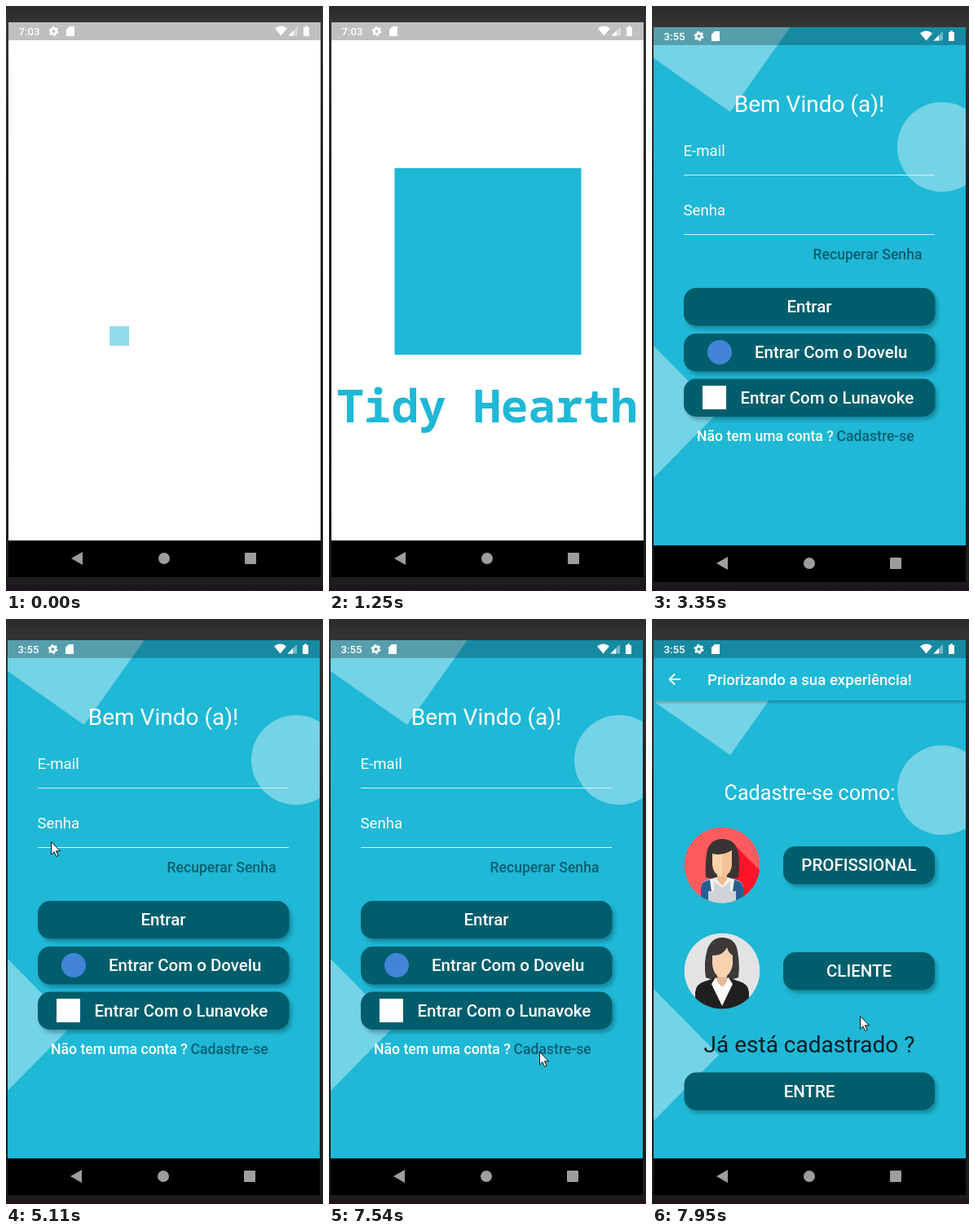
Animation, 389 px wide and 718 px high, one loop 8000 ms. Source, as an HTML page:

```html
<!DOCTYPE html>
<html lang="pt">
<head>
<meta charset="utf-8">
<style>
  html, body { margin: 0; width: 100%; height: 100%; overflow: hidden; background: #1e1e1e; }
  #stage { display: block; width: 389px; height: 718px; }
  text { font-family: Roboto, sans-serif; fill: #fff; white-space: pre; }
  .medium { font-weight: 500; }
  .button { fill: #005e6c; filter: drop-shadow(3px 4px 2px rgba(0, 40, 50, .3)); }
  .logo-name { font: 600 56px "Noto Sans Mono", monospace; fill: #1fb8d6; }
</style>
</head>
<body>
<svg id="stage" viewBox="0 0 389 718">
  <defs>
    <linearGradient id="desk" x2="0" y2="1">
      <stop offset="0" stop-color="#2b2b2c"/><stop offset=".03" stop-color="#343435"/>
      <stop offset=".3" stop-color="#222"/><stop offset=".985" stop-color="#1d1d1e"/>
      <stop offset="1" stop-color="#21131d"/>
    </linearGradient>
    <linearGradient id="barShadow" x2="0" y2="1">
      <stop stop-color="#000" stop-opacity=".25"/><stop offset="1" stop-color="#000" stop-opacity="0"/>
    </linearGradient>
    <clipPath id="disc"><circle r="46.5"/></clipPath>
  </defs>
  <rect width="389" height="718" fill="url(#desk)"/>
  <svg id="phone" width="383" height="681">
    <rect width="383" height="681" fill="#fff"/>
    <g id="splash">
      <rect id="mark" fill="#1fb8d6"/>
      <text id="logoName" class="logo-name" text-anchor="middle" y="20">Tidy Hearth</text>
    </g>
    <g id="login"></g>
    <g id="register"></g>
    <g id="system"></g>
  </svg>
  <circle id="click" cx="258" cy="531" r="12" fill="#fff" opacity=".4"/>
  <path id="cursor" d="M.5 .5V16L4 12.7L6.6 18.5L9 17.4L6.5 11.8H11.5Z" fill="#fff" stroke="#111"/>
</svg>
<script>
const $ = id => document.getElementById(id);
const DARK = '#075f70';

const label = (text, x, y, size, { fill = '#fff', medium = false, anchor = 'start' } = {}) =>
  `<text x="${x}" y="${y}" font-size="${size}" text-anchor="${anchor}" style="fill:${fill}"
    class="${medium ? 'medium' : ''}">${text}</text>`;
const centered = (text, x, y, size, options) => label(text, x, y, size, { anchor: 'middle', ...options });
const path = (d, fill) => `<path d="${d}" fill="${fill}"/>`;
const button = (x, y, width) => `<rect class="button" x="${x}" y="${y}" width="${width}" height="46.5" rx="15"/>`;
const underline = y => `<path d="M37 ${y}H345" stroke="#d5f3f9"/>`;

const backdrop = shift => `
  <rect width="383" height="640" fill="#1fb8d6"/>
  <g transform="translate(0 ${shift})" fill="#fff" fill-opacity=".38">
    <path d="M0 -40H196L94 104L0 38Z"/><circle cx="354" cy="147" r="55"/>
    <path d="M0 391L80 472L0 553Z"/>
  </g>`;

const medium = { medium: true };
const darkMedium = { medium: true, fill: DARK };

$('login').innerHTML = backdrop(0) +
  centered('Bem Vindo (a)!', 191, 104, 28) +
  label('E-mail', 36.5, 157.5, 18.6) + underline(181.5) +
  label('Senha', 36.5, 231, 18.6) + underline(254.5) +
  label('Recuperar Senha', 195.5, 285, 17.6, darkMedium) +
  button(37, 320, 308.5) + centered('Entrar', 191, 350, 20.5, medium) +
  button(37, 376, 308.5) + '<circle cx="81" cy="399" r="15" fill="#4285d8"/>' +
  label('Entrar Com o Dovelu', 124, 406, 20.5, medium) +
  button(37, 431.5, 308.5) + '<rect x="60" y="440" width="29" height="29" fill="#fff"/>' +
  label('Entrar Com o Lunavoke', 106.5, 461.5, 20.5, medium) +
  label('Não tem uma conta ?', 53, 508, 17.6, medium) +
  label('Cadastre-se', 224.5, 508, 17.6, darkMedium);

const maid = `<g transform="translate(84 276)"><g clip-path="url(#disc)">
  <circle r="46.5" fill="#ff5c60"/>
  ${path('M12 -28L60 20V60H20L-12 14Z', '#ff1429')}
  ${path('M-20 15Q-21 -2 -19 -14Q-16 -32 0 -32Q17 -32 20 -14Q22 2 20 15Q10 18 0 17Q-12 18 -20 15Z', '#383433')}
  ${path('M-26 47V28Q-26 20 -17 18L0 13L17 18Q26 20 26 28V47Z', '#f1f0ec')}
  ${path('M-26 47V28Q-26 20 -15 18L-11 47ZM26 47V28Q26 20 15 18L11 47Z', '#24618f')}
  ${path('M-6 8H6V18L0 25L-6 18Z', '#f2b98a')}
  ${path('M-12 -14Q0 -11 12 -18V0Q10 13 0 14Q-10 13 -12 0Z', '#fbd3aa')}
  ${path('M0 -13Q7 -14 12 -18V0Q10 13 0 14Z', '#f4c294')}
  ${path('M-10 20L0 28L10 20V32H17V47H-17V32H-10Z', '#cfd3d8')}
</g></g>`;

const client = `<g transform="translate(84 406)"><g clip-path="url(#disc)">
  <circle r="46.5" fill="#e3e3e3"/>
  ${path('M-20 8Q-23 -10 -18 -27Q-12 -42 1 -41Q17 -40 19 -24Q22 -8 20 8Q10 12 0 10Q-12 12 -20 8Z', '#3b3837')}
  ${path('M-33 47V26Q-32 16 -22 13L0 6L22 13Q32 16 33 26V47Z', '#211e1f')}
  ${path('M-8 8L0 13L8 8L13 16L0 43L-13 16Z', '#fafafa')}
  ${path('M-6 0H6V13L0 20L-6 13Z', '#e9b894')}
  ${path('M-12 -19Q2 -19 6 -29Q8 -22 13 -19V-8Q10 7 0 8Q-10 7 -12 -8Z', '#f8d2b0')}
</g></g>`;

$('register').innerHTML = backdrop(37) + `
  <rect y="74" width="383" height="5" fill="url(#barShadow)"/>
  <rect width="383" height="74" fill="#1fb8d6"/>
  <path d="M33 48H20M26 41.5L19.5 48L26 54.5" fill="none" stroke="#fff" stroke-width="2"/>` +
  label('Priorizando a sua experiência!', 66, 54.5, 18.6, medium) +
  centered('Cadastre-se como:', 191.5, 195.5, 25.1) +
  maid + button(159, 253, 186) + centered('PROFISSIONAL', 252, 283, 20.5, medium) +
  client + button(159, 383, 186) + centered('CLIENTE', 252, 413, 20.5, medium) +
  centered('Já está cadastrado ?', 191, 505.5, 28, { fill: '#0b1c22' }) +
  button(37.5, 530.5, 307.5) + centered('ENTRE', 191, 560.5, 20.5, medium);

$('system').innerHTML = `
  <rect width="383" height="22" fill="#000" opacity=".25"/>
  <text id="clock" class="medium" x="12.5" y="15.7" font-size="13.2"></text>
  <g fill="#fff">
    <circle cx="55.5" cy="11" r="3.3" fill="none" stroke="#fff" stroke-width="2.8"/>
    <circle cx="55.5" cy="11" r="5" fill="none" stroke="#fff" stroke-width="2" stroke-dasharray="2.6"/>
    <path d="M75 5H81V17H71V9Z"/>
    <path d="M327 7.5Q334.500 1.500 342 7.500L334.500 16.500Z"/>
    <path d="M355 5V16.500H343.500Z" opacity=".4"/><path d="M350 10V16.500H343.500Z"/>
    <path d="M362 6H364V4.500H367V6H369V17H362Z"/>
  </g>
  <rect y="636" width="383" height="45"/>
  <g fill="#9d9d9b">
    <path d="M77 658L91 650V666Z"/><circle cx="191" cy="658" r="7"/>
    <rect x="290" y="651" width="14" height="14" rx="1"/>
  </g>`;

// Pointer stops: time, x, y
const pointerStops = [
  [2100, 267, 720], [2400, 215, 520], [2600, 140, 359], [2790, 50, 425],
  [3349, 50, 425], [3350, 300, 720], [3420, 300, 720], [3940, 377, 455],
  [4050, 377, 455], [4700, 125, 151], [4880, 140, 171], [4930, 140, 171],
  [5110, 55, 273], [5190, 55, 273], [5450, 180, 378], [5750, 347, 270],
  [5840, 347, 270], [6050, 320, 248], [6690, 223, 486], [6720, 223, 486],
  [7000, 252, 533], [7180, 252, 533], [7300, 258, 531],
  [7680, 258, 531], [7950, 255, 487],
];

const lerp = (a, b, k) => a + (b - a) * k;
const progress = (t, from, to) => Math.min(1, Math.max(0, (t - from) / (to - from)));
const easeInOut = k => k * k * (3 - 2 * k);
const easeOut = k => 1 - (1 - k) ** 3;
const show = (id, on) => $(id).setAttribute('visibility', on ? 'visible' : 'hidden');
const place = (id, x, y, extra = '') => $(id).setAttribute('transform', `translate(${x} ${y}) ${extra}`);

function pointerAt(t) {
  const next = pointerStops.findIndex(stop => stop[0] > t);
  if (next === 0) return pointerStops[0].slice(1);
  if (next < 0) return pointerStops.at(-1).slice(1);
  const [t0, x0, y0] = pointerStops[next - 1];
  const [t1, x1, y1] = pointerStops[next];
  const k = easeInOut(progress(t, t0, t1));
  return [lerp(x0, x1, k), lerp(y0, y1, k)];
}

function drawSplash(t) {
  const grow = easeInOut(progress(t, 30, 840));
  const size = lerp(24, 229, grow);
  const mark = $('mark');
  mark.setAttribute('x', lerp(136, 192, grow) - size / 2);
  mark.setAttribute('y', lerp(385, 293.5, grow) - size / 2);
  mark.setAttribute('width', size);
  mark.setAttribute('height', size);
  mark.setAttribute('opacity', lerp(.5, 1, grow));

  const reveal = easeOut(progress(t, 850, 1250));
  place('logoName', 191, 471, `scale(${lerp(.3, 1, reveal)})`);
  $('logoName').setAttribute('opacity', reveal);
}

function render(t) {
  const second = t >= 3350;
  $('phone').setAttribute('x', second ? 2 : 3);
  $('phone').setAttribute('y', second ? 26 : 20);
  $('clock').textContent = second ? '3:55' : t >= 1950 ? '7:04' : '7:03';

  show('splash', t < 1800);
  show('login', t >= 1800);
  drawSplash(t);

  const opened = easeOut(progress(t, 7680, 7940));
  show('register', opened > 0);
  $('register').setAttribute('opacity', opened);
  place('register', 0, (1 - opened) * 150);

  show('click', t >= 7470 && t < 7540);
  show('cursor', t >= 2180);
  place('cursor', ...pointerAt(t));
}

function tick() {
  render(performance.now() % 8000);
  requestAnimationFrame(tick);
}
tick();
</script>
</body>
</html>
```
